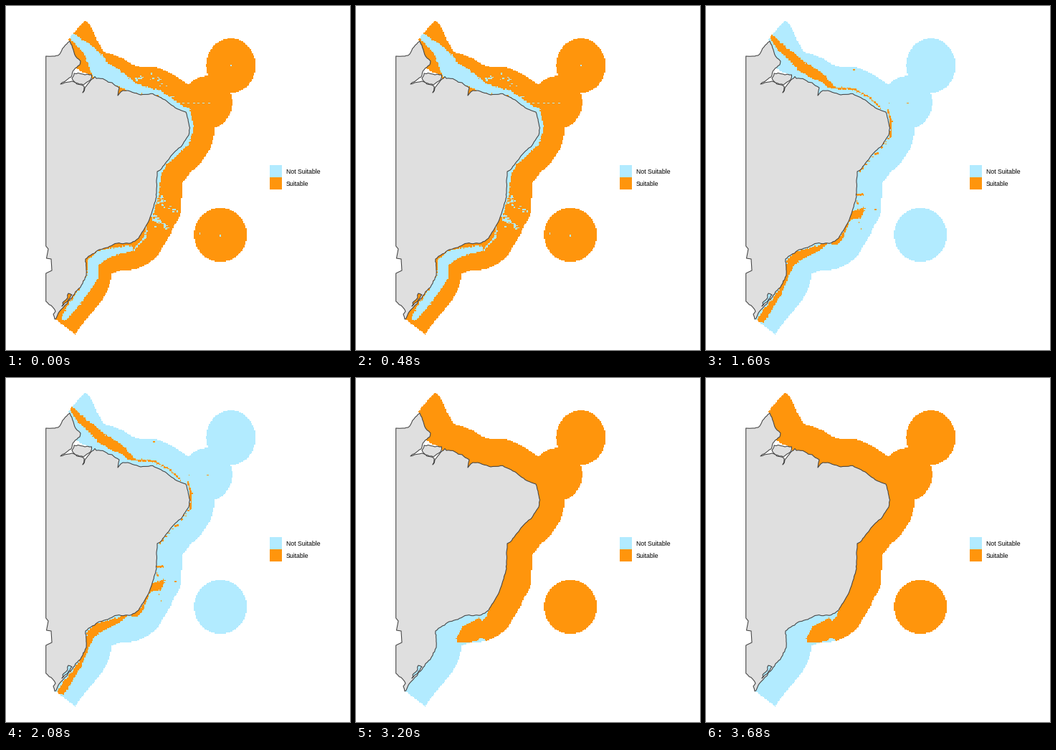
Animation of 480 by 480 pixels, one loop 4 s. Source, as a matplotlib script:

```python
import numpy as np
import matplotlib.pyplot as plt
from matplotlib.animation import FuncAnimation
from matplotlib.patches import Polygon, Rectangle
from matplotlib.path import Path

SIZE, DPI, CELL = 480, 72, 1.5
BLUE, ORANGE, LAND, LINE = "#b2ebff", "#ff950c", "#dfdfdf", "#444444"
PALETTE = np.array([[255, 255, 255], [178, 235, 255], [255, 149, 12]], np.uint8)
REACH = 35.3   # width of the sea zone
SQUASH = 0.95  # map scale, north-south against east-west

rng = np.random.default_rng(4)
axis = np.arange(CELL / 2, SIZE, CELL)
X, Y = np.meshgrid(axis, axis)
JX, JY = (g + rng.normal(0, 0.5, g.shape) for g in (X, Y))


def rough(pts, amp, step=3):
    """Line through pts with a small seeded wobble between them."""
    out = []
    for a, b in zip(pts, pts[1:]):
        a, b = np.array(a, float), np.array(b, float)
        n = max(1, round(np.hypot(*(b - a)) / step))
        out.append(a)
        out += [a + (b - a) * k / n + rng.normal(0, amp, 2) for k in range(1, n)]
    return out + [np.array(pts[-1], float)]


def inside(pts):
    cells = np.column_stack([X.ravel(), Y.ravel()])
    return Path(pts).contains_points(cells).reshape(X.shape)


def oval(cx, cy, rx, ry):
    return ((X - cx) / rx) ** 2 + ((Y - cy) / ry) ** 2 <= 1


def near(pts, width, x=X, y=Y, squash=1):
    """Cells within width of a line; width may differ from point to point."""
    widths = np.broadcast_to(width, len(pts))
    hit = np.zeros(x.shape, bool)
    for (ax, ay), (bx, by), wa, wb in zip(pts, pts[1:], widths, widths[1:]):
        dx, dy = bx - ax, by - ay
        t = np.clip(((x - ax) * dx + (y - ay) * dy) / (dx * dx + dy * dy), 0, 1)
        gap = np.hypot(x - ax - t * dx, (y - ay - t * dy) * squash)
        hit |= gap < wa + t * (wb - wa)
    return hit


def band(*keys):
    """Uneven stroke through (x, y, half width) keys."""
    return near([k[:2] for k in keys], [k[2] for k in keys], JX, JY)


def specks(pts, w=0.8, h=0.8):
    hit = np.zeros(X.shape, bool)
    for px, py in pts:
        hit |= (abs(X - px) < w) & (abs(Y - py) < h)
    return hit


def scatter(n, pts, spread):
    """Small specks strewn along a line through pts."""
    at, k = rng.uniform(0, len(pts) - 1, n), np.arange(len(pts))
    xy = np.column_stack([np.interp(at, k, axis_pts) for axis_pts in zip(*pts)])
    return specks(xy + rng.normal(0, spread, (n, 2)), 1.2, 0.9)


# Key points of the land, from the north-west corner round by the sea
border_n = rough([(55.7, 70), (68, 70), (75, 67), (81, 57), (89, 49)], 0.4)
cape = rough([(89, 49), (92, 55), (97, 70), (104, 77), (103, 82)], 0.4)
mouth = rough([(103, 82), (95, 89), (91, 99), (76, 109), (92, 105), (99, 109),
               (109, 112), (107, 121), (114, 109), (120, 102)], 0.5)
north = rough([(120, 102), (124, 98.5), (138, 103), (150, 109), (158, 114)], 0.7)
inlet = [(157, 118), (156, 125), (160, 120)]
north_east = rough([(163, 118), (170, 118), (188, 124), (205, 122.5), (222, 131),
                    (236, 142), (251, 148)], 0.3)
east = rough([(251, 148), (254, 158), (256.5, 170), (255, 180), (246, 194), (234, 205),
              (215, 229), (211, 231), (210, 246), (210, 266), (205, 283), (200, 298),
              (193, 311), (185, 324)], 0.3)
south = rough([(185, 324), (175, 330.5), (152, 331.5), (142, 337), (128, 341),
               (111, 353), (112, 376), (107, 387), (90, 409), (74, 427), (68, 437)], 0.5)
border_s = rough([(68, 437), (66, 430), (69, 426), (65, 420), (55.7, 412)], 0.3)
border_w = [(55.7, 373), (64, 369), (63, 353), (56.5, 352), (59, 339), (55.7, 335)]
island = rough([(95, 94), (104, 94.5), (119.5, 96), (118, 103), (108, 110),
                (97, 107), (92, 101), (95, 94)], 0.5)
lagoon = rough([(78, 419), (81, 412), (86, 407), (87, 401), (92, 403), (86, 412),
                (78, 419)], 0.5)

shore = cape + [(119, 97)] + north + north_east + east + south

# Sea zone: a fixed reach from the shore, cut at both borders, plus islands
seaward = inside([(89, 49), (86, 48), (109, 21.5), (400, 21), (400, 480), (125, 480),
                  (69, 437), (95, 385), (106, 348), (190, 300), (200, 200),
                  (120, 103), (119, 97), (104, 91), (97, 86)])
zone = near(shore[::3] + [shore[-1]], REACH, squash=SQUASH) & seaward
for cx, cy, rx, ry in ((314, 83.5, 34.3, 38.2), (281, 135, 35, 37),
                       (299.5, 319.7, 36.8, 37.6), (209, 280, 36, 37)):
    zone |= oval(cx, cy, rx, ry) & seaward


def deep_layer():
    """All but the shallow shelf."""
    shelf = band((92, 42, 4), (103, 51, 5.5), (116, 63, 8), (126, 77, 12), (134, 92, 14),
                 (150, 98, 12), (165, 106, 9), (178, 114, 7), (196, 119, 5),
                 (215, 122, 4), (244, 143, 4), (254, 146, 3.5), (259, 170, 3.5),
                 (252, 191, 4), (222, 220, 3), (213, 236, 3), (212, 258, 3), (203, 290, 3))
    shelf |= band((82, 435, 4), (90, 423, 6), (110, 396, 7), (121, 378, 8), (122, 358, 8),
                  (132, 350, 8), (146, 344, 6), (174, 338, 3))
    shelf |= band((204, 288, 1), (206, 300, 1), (221, 304, 1), (222, 311, 1))
    shelf |= band((196, 308, 1), (195, 322, 1), (179, 340, 1), (165, 344, 1))
    shelf |= scatter(26, [(212, 264), (220, 278), (238, 283)], 2.5)
    shelf |= scatter(24, [(207, 292), (213, 300), (228, 311)], 3)
    shelf |= scatter(26, [(180, 100), (212, 101), (230, 127), (238, 135)], 2.5)
    shelf |= specks([(x, 135.5) for x in range(241, 284, 7)], 1.6)
    return ~(shelf | specks([(314, 83), (271, 318), (299, 321)]))


def patch_layer():
    """Few spots close to the shore."""
    spots = band((193, 311, 1), (196, 306, 2.2), (202, 297, 1.2))
    spots |= scatter(9, [(188, 322), (200, 298), (206, 284)], 0.8)
    return spots | specks([(90, 48), (95, 55), (258, 181), (212, 259)])


def shelf_layer():
    """The middle shelf."""
    shelf = band((92, 43, 3), (104, 58, 5), (122, 73, 6), (135, 85, 7), (152, 95, 7),
                 (163, 101, 5), (172, 110, 4), (180, 115, 1.5), (206, 116, 1),
                 (228, 128, 1), (244, 143, 0.9))
    shelf |= band((72, 440, 2), (78, 437, 5), (86, 425, 5), (103, 400, 3), (114, 373, 3),
                  (119, 358, 6), (128, 349, 7), (142, 344, 5), (155, 339, 4), (167, 333, 2))
    shelf |= band((175, 330, 2), (182, 329, 4.5), (191, 321, 1.5), (201, 298, 1.5),
                  (206, 292, 5), (213, 290, 6), (221, 283, 2))
    shelf |= band((254, 144, 1.2), (256, 152, 0.9), (258, 160, 1.2), (258, 182, 1.2))
    shelf |= scatter(24, [(258, 180), (246, 198), (222, 221), (213, 234)], 0.7)
    shelf |= band((210, 263, 1.5), (219, 263, 1.5)) | band((210, 272, 1), (213, 277, 1))
    return shelf | specks([(207, 89), (256, 136), (282, 136), (237, 284), (214, 302),
                           (217, 311)], 1.2)


def coast_layer():
    """A strip along the whole shore."""
    return near(shore, 3.5)


def warm_layer():
    """All apart from the far south."""
    return ~inside([(187, 322), (182, 333), (176, 339), (172, 335), (149, 347), (140, 364),
                    (142, 369), (168, 368), (174, 362), (184, 368), (184, 480), (50, 480),
                    (50, 320)])


layers = [deep_layer(), patch_layer(), shelf_layer(), coast_layer(), warm_layer()]
images = [PALETTE[np.where(zone, 1 + m.astype(int), 0)] for m in layers]

fig = plt.figure(figsize=(SIZE / DPI, SIZE / DPI), dpi=DPI, facecolor="white")
ax = fig.add_axes([0, 0, 1, 1])
ax.axis("off")
sea = ax.imshow(images[0], extent=(0, SIZE, SIZE, 0), interpolation="nearest",
                aspect="auto")
ax.set(xlim=(0, SIZE), ylim=(SIZE, 0))


def shape(pts, fill):
    return ax.add_patch(Polygon(pts, closed=True, fc=fill, ec=LINE, lw=1.07,
                                joinstyle="round"))


shape(border_n + cape + mouth + north + inlet + north_east + east + south
      + border_s + border_w, LAND)
shape(island, LAND)
lake = shape(lagoon, ORANGE)

for top, fill, label in ((222, BLUE, "Not Suitable"), (239, ORANGE, "Suitable")):
    ax.add_patch(Rectangle((368, top), 17, 17, fc=fill, ec="none"))
    ax.text(391, top + 12, label, family="Liberation Sans", size=8.8, color="black")


def draw(i):
    sea.set_data(images[i])
    lake.set_facecolor(ORANGE if i == 0 else BLUE)
    return sea, lake


anim = FuncAnimation(fig, draw, frames=len(images), interval=800, repeat=True)
plt.show()
```
